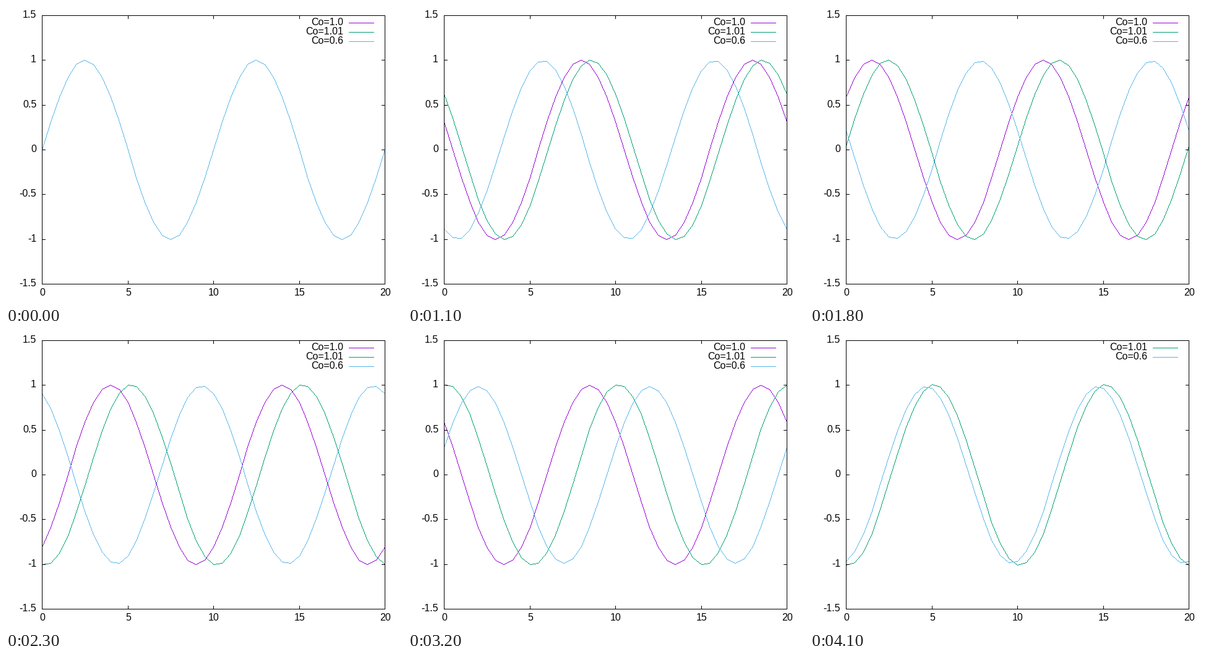
A matplotlib script that plays this animation: 640 px wide and 480 px high, repeating every 4.2 s.

```python
import matplotlib.pyplot as plt
import numpy as np
from matplotlib.animation import FuncAnimation

W, H, DPI = 640, 480, 100
LEFT, RIGHT, TOP, BOTTOM = 58, 612, 15, 449
TICK = 5
ROW = 15                           # line height
FONT = 16                          # font size in pixels
BASE = 4                           # baseline below the line it labels
STEPS = 42

DX = 0.5
WAVE = 2 * np.pi / 10
X = np.arange(0, 20 + DX, DX)

BLACK = (0, 0, 0)
# label, Courant number, colour, last step with data
SERIES = [
    ("Co=1.0", 1.0, (148, 0, 211), 40),
    ("Co=1.01", 1.1, (0, 158, 115), 41),
    ("Co=0.6", 0.6, (86, 180, 233), 41),
]
# character widths in em; digits and "o" use the default
WIDTHS = {"C": 0.722, "=": 0.584, ".": 0.278, "-": 0.333}

plt.rcParams["font.family"] = "Liberation Sans"
plt.rcParams["text.hinting"] = "default"
fig = plt.figure(figsize=(W / DPI, H / DPI), dpi=DPI, facecolor="white")


def to_px(x):
    return np.floor(LEFT + (RIGHT - LEFT) * np.asarray(x) / 20 + 0.5).astype(int)


def to_py(y):
    return np.floor(BOTTOM - (BOTTOM - TOP) * (np.asarray(y) + 1.5) / 3 + 0.5).astype(int)


def hline(img, x0, x1, y, color=BLACK):
    img[y, x0:x1 + 1] = color


def vline(img, x, y0, y1):
    img[y0:y1 + 1, x] = BLACK


def along(a0, b0, a1, b1):
    """Pixels of a line whose longer side runs along a."""
    if a0 > a1:
        a0, b0, a1, b1 = a1, b1, a0, b0
    n = a1 - a0
    t = np.arange(n + 1)
    offset = (2 * t * abs(b1 - b0) + n) // max(2 * n, 1)
    return a0 + t, b0 + np.sign(b1 - b0) * offset


def polyline(img, xs, ys, color):
    """One-pixel line without antialiasing."""
    for x0, y0, x1, y1 in zip(xs, ys, xs[1:], ys[1:]):
        if abs(x1 - x0) >= abs(y1 - y0):
            px, py = along(x0, y0, x1, y1)
        else:
            py, px = along(y0, x0, y1, x1)
        img[py, px] = color


def text(x, y, s, align):
    """Text placed by its advance width; align is 0.5 for centre, 1 for right."""
    width = FONT * sum(WIDTHS.get(c, 0.556) for c in s)
    left = np.floor(x - align * width)
    return fig.text(left, H - y, s, transform=None, ha="left", va="baseline",
                    size=FONT * 72 / DPI, color="black")


def draw_border(img):
    for y in (TOP, BOTTOM):
        hline(img, LEFT, RIGHT, y)
    for x in (LEFT, RIGHT):
        vline(img, x, TOP, BOTTOM)
    for x in to_px(X_TICKS):
        vline(img, x, TOP, TOP + TICK)
        vline(img, x, BOTTOM - TICK, BOTTOM)
    for y in to_py(Y_TICKS):
        hline(img, LEFT, LEFT + TICK, y)
        hline(img, RIGHT - TICK, RIGHT, y)


def wave(co, n):
    """Sine after n Lax-Wendroff steps on a periodic grid."""
    theta = WAVE * DX
    gain = 1 - 1j * co * np.sin(theta) - co**2 * (1 - np.cos(theta))
    return (gain**n * np.exp(1j * WAVE * X)).imag


X_TICKS = np.arange(0, 21, 5)
Y_TICKS = np.arange(-1.5, 1.6, 0.5)
for v in X_TICKS:
    text(to_px(v) + 1, BOTTOM + ROW + BASE, str(v), 0.5)
for v in Y_TICKS:
    text(49.5, to_py(v) + BASE, f"{v:g}", 1)

labels = [text(545.5, 0, name, 1) for name, *_ in SERIES]
canvas = fig.figimage(np.full((H, W, 3), 255, np.uint8), origin="upper")


def update(n):
    img = np.full((H, W, 3), 255, np.uint8)
    row = TOP + 12
    for (_, co, color, last), label in zip(SERIES, labels):
        label.set_visible(n <= last)
        if n > last:
            continue
        polyline(img, to_px(X), to_py(wave(co, n)), color)
        hline(img, 554, 594, row, color)
        label.set_y(H - row - BASE)
        row += ROW
    draw_border(img)
    canvas.set_data(img)
    return [canvas, *labels]


anim = FuncAnimation(fig, update, frames=STEPS, interval=100, repeat=True,
                     repeat_delay=0, blit=False)
plt.show()
```
